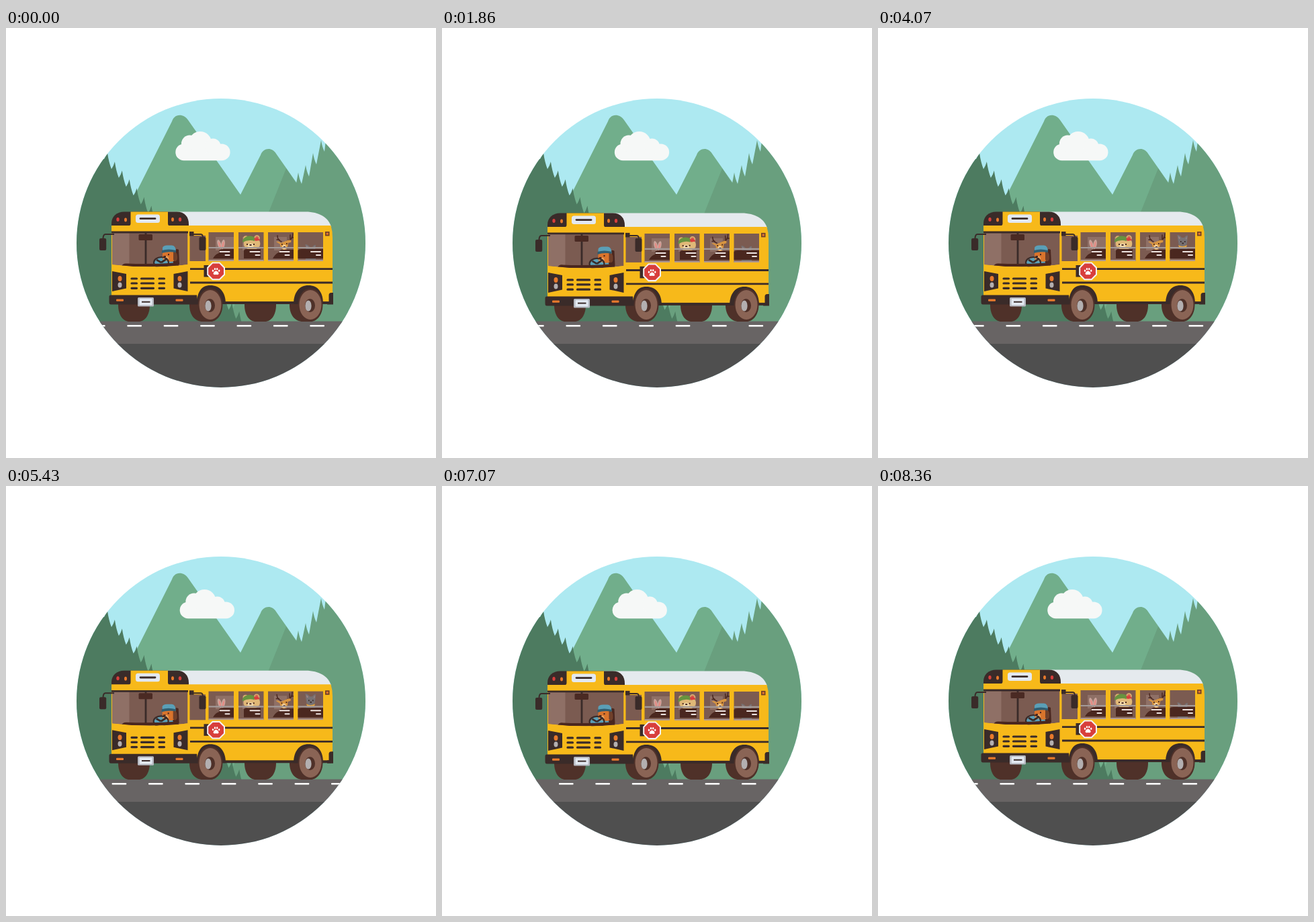
An HTML page for the animation above (8.43 s loop, 640x640 px).

```html
<!DOCTYPE html>
<html lang="en">
<head>
<meta charset="utf-8">
<title>School bus</title>
<style>
html, body { margin: 0; width: 100%; height: 100%; overflow: hidden; background: #fff; }
svg { display: block; width: 100vw; height: 100vh; }
.yellow { fill: #f7b91a; }
.dark { fill: #3a2b29; }
.seat { fill: #4a271f; }
.tyre { fill: #4f3129; }
.glass { fill: #7b5b51; }
.pale { fill: #8f7066; }
.orange { fill: #e8792c; }
.red { fill: #d83e3c; }
.grey { fill: #b3afb0; }
.light { fill: #e5eaee; }
.blue { fill: #5a9fb7; }
.line { fill: none; stroke: #3a2b29; stroke-width: 2.8; }
.round { stroke-linecap: round; }
</style>
</head>
<body>
<svg viewBox="0 0 640 640">
  <defs>
    <clipPath id="disc"><circle cx="320" cy="320" r="215"/></clipPath>
    <clipPath id="panes"><path d="M301.500 304h37.500v43h-37.500zM346 304h37.500v43h-37.500zM390 304h38v43h-38zM434.500 304h37.500v43h-37.500z"/></clipPath>
    <clipPath id="screen"><path id="screenShape" d="M158 304H270.500V352Q214 359 158 352Z"/></clipPath>
  </defs>

  <g clip-path="url(#disc)">
    <rect x="100" y="100" width="440" height="440" fill="#ade9f1"/>
    <path fill="#71ae8b" d="M150 332L247 139C251 127 264 127 271 137L349 248L379 189C383 178 396 177 402 187L480 298V440H150Z"/>
    <path id="rightTrees" fill="#699f7e"/>
    <path id="leftTrees" fill="#4d7b60"/>
    <g id="cloud" fill="#f6f8f7">
      <rect x="252.300" y="172.500" width="81.300" height="24.700" rx="12.300"/>
      <circle cx="273.500" cy="172" r="12.500"/>
      <circle cx="289" cy="171" r="17"/>
      <circle cx="308" cy="176" r="11.500"/>
    </g>
    <rect x="100" y="436.500" width="440" height="34" fill="#686464"/>
    <rect x="100" y="470" width="440" height="70" fill="#4f4f4f"/>
    <g id="dashes" fill="#fff"></g>
  </g>

  <g class="tyre">
    <path d="M167 405H214V412C214 427 207 437 197 437H184C174 437 167 427 167 412Z"/>
    <path d="M355 405H402V412C402 427 395 437 385 437H372C362 437 355 427 355 412Z"/>
    <path d="M273 405H322V412C322 427 314 437 304 437H293C281 437 273 427 273 412Z"/>
    <path d="M422 405H471V412C471 427 463 437 453 437H442C430 437 422 427 422 412Z"/>
  </g>

  <g id="bus">
    <path class="light" d="M240 273.500H446C466 273.500 480 282 484 296H240Z"/>
    <path class="yellow" d="M268 294H483.500Q486 302 486 312V410H268Z"/>
    <rect class="dark" x="318" y="407" width="166" height="4"/>
    <path class="dark" d="M487 411.500H478V407H480.500V397Q481 394 484 394H487Z"/>
    <path class="line" d="M274 358.600H486M274 379H486"/>

    <rect class="glass" x="273.500" y="309" width="23.500" height="38"/>
    <g clip-path="url(#panes)">
      <rect class="glass" x="300" y="304" width="174" height="44"/>
      <path class="pale" d="M312 311h27v20h-27zM352 311h26v20h-26zM399 311h19v20h-19z"/>

      <g id="rabbit">
        <ellipse cx="317.500" cy="322" rx="2.700" ry="7" fill="#c9a49b" transform="rotate(-17 317.500 322)"/>
        <ellipse cx="323" cy="322" rx="2.700" ry="7" fill="#c9a49b" transform="rotate(10 323 322)"/>
        <ellipse cx="318" cy="323" rx="1.200" ry="5" fill="#e58b84" transform="rotate(-17 318 323)"/>
        <ellipse cx="323" cy="323" rx="1.200" ry="5" fill="#e58b84" transform="rotate(10 323 323)"/>
      </g>

      <g id="bear">
        <circle cx="357" cy="313" r="3.800" fill="#d9ad6e"/>
        <circle cx="373.500" cy="312.500" r="4.200" fill="#d9ad6e"/>
        <circle cx="373.500" cy="312.500" r="2.500" fill="#d85c50"/>
        <ellipse cx="366" cy="321" rx="12.300" ry="9.500" fill="#e0b877"/>
        <path fill="#67933f" d="M352 317C354 309 366 307 371 313L370 317Q361 314 352 319Z"/>
        <path class="red" d="M369 313Q376 311 378 316L371 317Z"/>
        <ellipse cx="364" cy="324" rx="4.500" ry="3.300" fill="#f0d8aa"/>
        <path class="seat" d="M358 321h2v2h-2zM368 321h2v2h-2zM362.500 322h3v2h-3z"/>
      </g>

      <g id="deer">
        <path class="round" fill="none" stroke="#4a271f" stroke-width="1.500" d="M410 318Q404 316 404 309M407 315L403 315M418 317Q427 316 427 306M423 314L423 308M425 312L429 312"/>
        <path fill="#d89540" d="M402 318Q407 317 409 320L419 316Q426 314 424 319L420 320Q420 329 414 331Q408 328 408 322Z"/>
        <ellipse cx="414" cy="326" rx="3" ry="3.500" fill="#efd0a0"/>
        <path class="seat" d="M410 321h1.700v2h-1.700zM417 320h1.700v2h-1.700zM413 325h3v2h-3z"/>
      </g>

      <g id="pup">
        <path fill="#777173" d="M447 319L445.500 308Q449 308 452 312H456Q459 308 461 309L460 319Q460 325 453.500 325Q447 325 447 319Z"/>
        <path fill="#a98582" d="M448 314L447 310Q449 311 450 313ZM458 313L460 310.500L459 315Z"/>
        <path fill="#777173" d="M445 335Q446 323 453.500 323Q461 323 462 335Z"/>
        <path fill="#e6a53b" d="M447 323Q453 327 460 323L459 326Q454 330 448 326Z"/>
        <path class="dark" d="M450 317h1.600v2h-1.600zM456 317h1.600v2h-1.600zM452.500 319.500h2.500v2h-2.500z"/>
      </g>

      <g class="seat">
        <path d="M308 343Q312 336 317 335V331Q319 329 324 329H340V343Z"/>
        <path d="M354 343V331Q355 329 358 329H379V343Z"/>
        <path d="M397 343Q401 336 406 334Q408 329 413 330H428V343Z"/>
        <path d="M434 343V331Q436 329 440 329H473V343Z"/>
      </g>
      <path fill="none" stroke="#a39a98" stroke-width="2.200" d="M300 327H473"/>
      <path fill="none" stroke="#b09a92" stroke-width="2" d="M300 346H473"/>
      <path id="glints" class="round" fill="none" stroke="#efe5e2" stroke-width="2"/>
    </g>
    <rect x="475" y="303" width="6.500" height="6.500" fill="#70402a"/>
    <rect class="orange" x="476.700" y="304.700" width="3" height="3"/>

    <path class="dark" d="M284 411C284 393 291 383 304 383C318 383 327 393 327 411Z"/>
    <path class="dark" d="M428 411C428 393 437 383 450 383C464 383 472 393 472 411Z"/>

    <path class="yellow" d="M157 292H272V340L273 398H157Z"/>
    <path class="dark" d="M157 294V291C157 280 165 273.500 176 273.500H254C266 273.500 272 281 272 292V294Z"/>
    <path class="yellow" d="M185.500 273.500H241V291Q241 294 244 295H182Q185.500 294 185.500 291Z"/>
    <rect x="193" y="277.500" width="36" height="12.500" rx="3.500" fill="#e3e9f1"/>
    <path class="line round" stroke-width="2" d="M200 283.700H222"/>
    <g class="red"><ellipse cx="166.500" cy="285" rx="2.200" ry="3"/><ellipse cx="259" cy="285" rx="2.200" ry="3"/></g>
    <g class="orange"><ellipse cx="178" cy="285.500" rx="2" ry="3"/><ellipse cx="248" cy="285" rx="2" ry="3"/></g>

    <g clip-path="url(#screen)">
      <use href="#screenShape" class="glass"/>
      <rect class="pale" x="158" y="304" width="25.500" height="50"/>
      <path class="line" stroke-width="2" d="M208 304V352"/>
      <rect class="dark" x="197.500" y="307" width="20.500" height="9" rx="1.500" style="fill:#4a2a23"/>
      <g id="driver">
        <path class="seat" d="M250 332Q252 327 257 330L258 352H248Z"/>
        <path class="blue" d="M219 351Q224 341 233 342L248 346L250 353H219Z"/>
        <path fill="#d9742c" d="M233 333H253V341C253 347 247 349 241 347L233 344Z"/>
        <path fill="#70402a" d="M249 332Q256 333 255 344Q253 350 249 345Z"/>
        <ellipse cx="238" cy="343" rx="4" ry="3.500" fill="#eda560"/>
        <path class="seat" d="M234.500 339h3.500v2.500h-3.500zM241 336h2v2.300h-2z"/>
        <path class="blue" d="M233 332V327Q234 323.500 240 323.500H247Q253 324 253 333Z"/>
        <path fill="#315d70" d="M232 331Q242 328 253 331V334Q242 332 232 335Z"/>
        <ellipse cx="231" cy="349" rx="11" ry="8" class="line" style="stroke-width:2.200"/>
        <path class="line" stroke-width="2" d="M231 349L240 343M231 349L224 345"/>
      </g>
      <path class="seat" d="M172 355Q173 350 180 350.500Q214 352 251 349.500Q257 350 258 355Z"/>
    </g>
    <path class="line" stroke-width="3" d="M157 304H271"/>

    <path class="dark" d="M158 362L179 366V387.500L158 392ZM270.500 362L249.500 366V387.500L270.500 392Z"/>
    <g class="orange"><ellipse cx="169.500" cy="373" rx="3" ry="4"/><ellipse cx="258.500" cy="373" rx="3" ry="4"/></g>
    <g class="grey"><ellipse cx="169.500" cy="382.500" rx="3" ry="4"/><ellipse cx="258.500" cy="382.500" rx="3" ry="4"/></g>
    <path id="grill" class="line round" style="stroke-width:3.200"/>

    <path class="dark" d="M156 397.500H284L286 411.500H156Q153.500 411.500 153.500 408V400Q153.500 397.500 156 397.500Z"/>
    <rect class="orange" x="164" y="403.500" width="11" height="3.300" rx="1"/>
    <rect class="orange" x="252.500" y="403.500" width="11" height="3.300" rx="1"/>
    <rect x="196" y="401" width="24" height="13.500" rx="1.500" fill="#b7bac2"/>
    <rect x="198.500" y="403" width="19" height="9.500" rx="1" fill="#e3e9f1"/>
    <path class="line" stroke-width="2" d="M202 407.700H214.500" style="stroke-width:2"/>

    <path class="line" style="stroke-width:2" d="M161 307H148Q144.500 307 144.500 314M277 307H290Q293 307 293 312"/>
    <rect class="dark" x="139" y="313" width="10.200" height="18" rx="2"/>
    <rect class="dark" x="287.500" y="311" width="10" height="20" rx="2"/>
    <rect class="dark" x="273" y="303" width="6.500" height="6.500"/>

    <rect class="dark" x="294.500" y="353" width="7" height="17.500"/>
    <path fill="#f4f2f2" d="M307 348.500H318.200L326 356.300V367.500L318.200 375.300H307L299.200 367.500V356.300Z"/>
    <path class="red" d="M307.800 350.600H317.400L324 357.200V366.600L317.400 373.200H307.800L301.200 366.600V357.200Z"/>
    <g fill="#fff">
      <path d="M308.500 366Q309 362 312.600 361.500Q316.200 362 316.700 366Q315 368 312.600 366.700Q310.200 368 308.500 366Z"/>
      <ellipse cx="308" cy="361.300" rx="1.200" ry="1.700"/><ellipse cx="311" cy="358.800" rx="1.200" ry="1.800"/>
      <ellipse cx="314.200" cy="358.800" rx="1.200" ry="1.800"/><ellipse cx="317.200" cy="361.300" rx="1.200" ry="1.700"/>
    </g>
  </g>

  <g id="wheels"></g>
</svg>
<script>
const $ = id => document.getElementById(id);
const LOOP = 8430, FPS = 14, PERIOD = 4215, GAP = 54.4;

// static repeats
let left = "M90 440V190L146 195";
for (let i = 0; i < 19; i++) {
  const x = 151 + 10.9 * i, y = 186 + 13.1 * i;
  left += `L${x} ${y}Q${x + 2} ${y + 14} ${x + 6} ${y + 24}`;
  if (i < 18) left += `Q${x + 9} ${y + 20} ${x + 10.9} ${y + 13.1}`;
}
$("leftTrees").setAttribute("d", left + "V440Z");

const tips = [[435, 215], [446, 204], [457, 186], [469, 167], [478, 150]];
let right = "M330 440L391 274L417 209L432 231";
for (const [x, y] of tips) right += `L${x} ${y}Q${x + 1.500} ${y + 10} ${x + 5} ${y + 17}`;
$("rightTrees").setAttribute("d", right + "H550V440Z");

let rows = "";
for (const y of [373, 380, 387.3])
  rows += `M187 ${y}H194.500M201.500 ${y}H219.500M228 ${y}H235.500`;
$("grill").setAttribute("d", rows);

$("glints").setAttribute("d", [318.5, 363.5, 407.5, 454]
  .map(x => `M${x} 333H${x + 14}M${x + 8} 338H${x + 14}`).join(""));

$("wheels").innerHTML = [304, 453].map(x => `
  <ellipse cx="${x}" cy="412" rx="18.500" ry="24.500" class="tyre"/>
  <ellipse cx="${x}" cy="412" rx="16.500" ry="22" fill="#8a6455"/>
  <ellipse cx="${x - 0.5}" cy="413" rx="7.500" ry="10" class="tyre"/>
  <ellipse cx="${x - 3}" cy="413.500" rx="4.600" ry="8" class="grey"/>`).join("");

for (let i = -2; i < 7; i++)
  $("dashes").innerHTML += `<rect x="${180.3 + i * GAP}" y="442" width="21.700" height="2.500" rx="1"/>`;

// smooth 0..1 between two times
const ramp = (t, a, b) => {
  const p = Math.min(1, Math.max(0, (t - a) / (b - a)));
  return (1 - Math.cos(Math.PI * p)) / 2;
};
const move = (id, x, y) => $(id).setAttribute("transform", `translate(${x.toFixed(3)} ${y.toFixed(3)})`);
const turn = (id, a, x, y) => $(id).setAttribute("transform", `rotate(${a.toFixed(3)} ${x} ${y})`);

function draw(time) {
  // steps at 14 per second, drawn from a 25 per second clock
  const step = Math.floor((time + 5) * FPS / 1000);
  const tick = Math.ceil(step * 25 / FPS - 1e-6);
  const t = tick * 40;
  const u = t % PERIOD;
  const sink = ramp(u, 150, 1900) - ramp(u, 3100, 4100);

  move("bus", 0, 1.9 * sink);
  move("dashes", (tick * 7.033) % GAP, 0);
  move("cloud", 4.5 * (1 - Math.cos(2 * Math.PI * t / LOOP + 0.2)) - 0.1, 0);
  move("pup", 0, 14 * (1 - ramp(t, 2600, 3500) + ramp(t, 5600, 6500)));
  turn("rabbit", 3 * sink, 320, 335);
  turn("bear", -2 * sink, 366, 332);
  turn("deer", -3 * sink, 412, 334);
  move("driver", -0.5 * sink, 0);
}

const start = performance.now();
function loop() {
  draw((performance.now() - start) % LOOP);
  requestAnimationFrame(loop);
}
draw(0);
requestAnimationFrame(loop);
</script>
</body>
</html>
```
